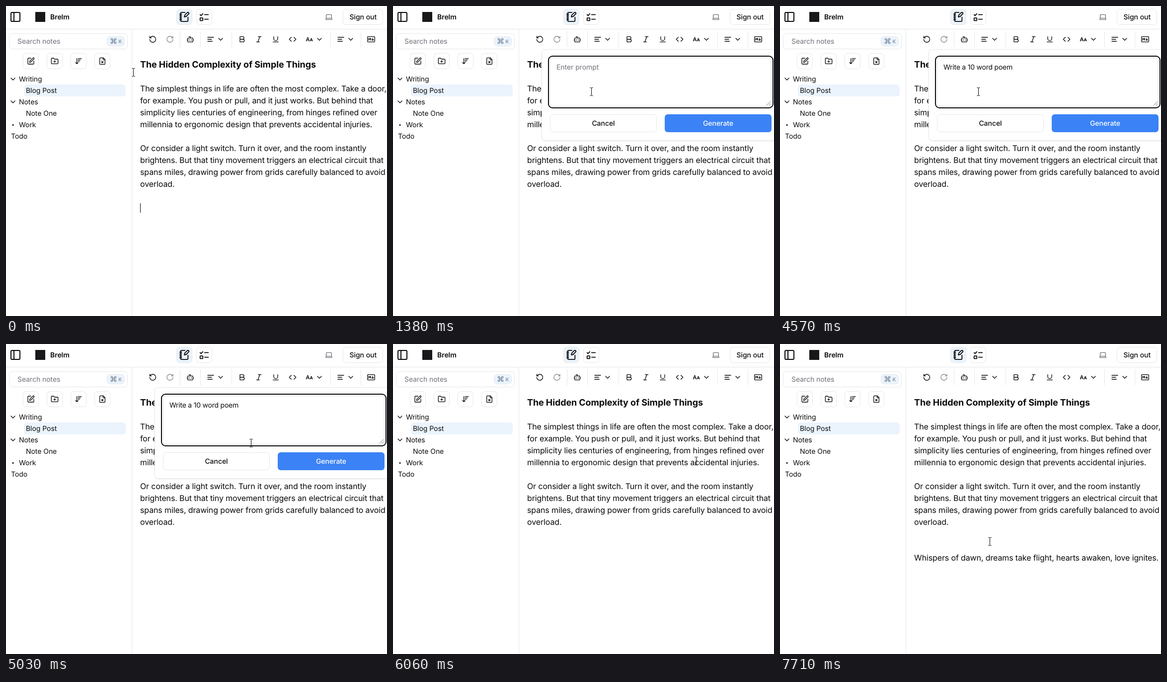
An HTML page that plays this animation: 767 by 624 pixels, repeating every 8000 ms.

```html
<!DOCTYPE html>
<html lang="en">
<head>
<meta charset="utf-8">
<title>Notes editor</title>
<style>
  html, body { margin: 0; width: 100%; height: 100%; overflow: hidden; background: #fff; }
  svg { display: block; width: 767px; height: 624px; }
  text { font-family: Inter, Roboto, sans-serif; font-size: 14px; letter-spacing: -.05px; fill: #0c0c0e; white-space: pre; text-rendering: geometricPrecision; }
  .body { font-size: 16px; letter-spacing: -.13px; fill: #09090b; }
  .title { font-size: 18px; font-weight: 700; letter-spacing: -.1px; }
  .medium { font-weight: 500; }
  .strong { font-weight: 600; }
  .mid { text-anchor: middle; }
  .muted { fill: #71717a; }
  .prompt { letter-spacing: -.22px; }
  .line { fill: none; stroke: #e5e7eb; }
  .icon { fill: none; stroke: #09090b; stroke-width: 2; stroke-linecap: round; stroke-linejoin: round; }
</style>
</head>
<body>
<svg id="stage" viewBox="0 0 767 624" xmlns="http://www.w3.org/2000/svg"></svg>
<script>
const LOOP = 8000;
const stage = document.getElementById('stage');

// Icon outlines on a 24 unit grid.
const PEN = 'M18.4 2.6a1 1 0 0 1 3 3l-9 9a2 2 0 0 1-.9.5l-2.9.9a.5.5 0 0 1-.6-.6l.9-2.9a2 2 0 0 1 .5-.9z';
const ICONS = {
  panel: 'M5 3h14a2 2 0 0 1 2 2v14a2 2 0 0 1-2 2H5a2 2 0 0 1-2-2V5a2 2 0 0 1 2-2zM9 3v18',
  notebook: 'M13.4 2H6a2 2 0 0 0-2 2v16a2 2 0 0 0 2 2h12a2 2 0 0 0 2-2v-7.4M2 6h4M2 10h4M2 14h4M2 18h4M21.4 5.6a1 1 0 1 0-3-3l-5 5a2 2 0 0 0-.5.9l-.9 2.9a.5.5 0 0 0 .6.6l2.9-.9a2 2 0 0 0 .9-.5z',
  tasks: 'M3 7l2 2 4-4M13 7h8M13 17h8M4 14h4a1 1 0 0 1 1 1v4a1 1 0 0 1-1 1H4a1 1 0 0 1-1-1v-4a1 1 0 0 1 1-1z',
  laptop: 'M20 16V7a2 2 0 0 0-2-2H6a2 2 0 0 0-2 2v9m16 0H4m16 0 1.3 2.5a1 1 0 0 1-.9 1.5H3.6a1 1 0 0 1-.9-1.5L4 16',
  command: 'M15 6v12a3 3 0 1 0 3-3H6a3 3 0 1 0 3 3V6a3 3 0 1 0-3 3h12a3 3 0 1 0-3-3',
  edit: 'M12 3H5a2 2 0 0 0-2 2v14a2 2 0 0 0 2 2h14a2 2 0 0 0 2-2v-7' + PEN,
  folder: 'M12 10v6M9 13h6M20 20a2 2 0 0 0 2-2V8a2 2 0 0 0-2-2h-7.9a2 2 0 0 1-1.7-.9l-.8-1.2A2 2 0 0 0 7.9 3H4a2 2 0 0 0-2 2v13a2 2 0 0 0 2 2Z',
  sort: 'M3 16l4 4 4-4M7 20V4M11 4h10M11 8h7M11 12h4',
  file: 'M15 2H6a2 2 0 0 0-2 2v16a2 2 0 0 0 2 2h12a2 2 0 0 0 2-2V7ZM14 2v4a2 2 0 0 0 2 2h4M14.5 12.5l-5 5M9.5 12.5l5 5',
  chevron: 'M6 9l6 6 6-6',
  undo: 'M3 12a9 9 0 1 0 9-9 9.8 9.8 0 0 0-6.7 2.7L3 8M3 3v5h5',
  redo: 'M21 12a9 9 0 1 1-9-9c2.5 0 4.9 1 6.7 2.7L21 8M21 3v5h-5',
  bot: 'M12 8V4H8M6 8h12a2 2 0 0 1 2 2v8a2 2 0 0 1-2 2H6a2 2 0 0 1-2-2v-8a2 2 0 0 1 2-2zM2 14h2M20 14h2M15 13v2M9 13v2',
  align: 'M21 6H3M15 12H3M17 18H3',
  bold: 'M6 12h9a4 4 0 0 1 0 8H7a1 1 0 0 1-1-1V5a1 1 0 0 1 1-1h7a4 4 0 0 1 0 8',
  italic: 'M19 4h-9M14 20H5M15 4 9 20',
  underline: 'M6 4v6a6 6 0 0 0 12 0V4M4 20h16',
  code: 'M16 18l6-6-6-6M8 6l-6 6 6 6',
  markdown: 'M3 4h18a2 2 0 0 1 2 2v12a2 2 0 0 1-2 2H3a2 2 0 0 1-2-2V6a2 2 0 0 1 2-2zM5 15V9l3 3 3-3v6M17 9v6M14.5 13l2.5 2.5 2.5-2.5'
};

const icon = (name, cx, cy, size = 16, color = '#09090b') =>
  `<path class="icon" d="${ICONS[name]}" style="stroke:${color}" transform="translate(${cx - size / 2} ${cy - size / 2}) scale(${size / 24})"/>`;
const text = (x, y, str, cls = '', extra = '') => `<text x="${x}" y="${y}" class="${cls}" ${extra}>${str}</text>`;
const box = (x, y, w, h, fill = 'none', extra = '') =>
  `<rect class="line" x="${x + .5}" y="${y + .5}" width="${w - 1}" height="${h - 1}" rx="6" style="fill:${fill}" ${extra}/>`;
const rule = d => `<path class="line" d="${d}"/>`;

const header = () =>
  rule('M0 46.5H767M253.5 47V624') +
  icon('panel', 19, 22, 24) +
  '<rect x="59" y="12" width="20" height="20" fill="#18181b"/>' +
  text(89, 27, 'Brelm', 'strong') +
  box(343, 6, 32, 32, '#ebf4fd') + icon('notebook', 359, 22, 22) +
  box(383, 6, 32, 32) + icon('tasks', 399, 22, 22) +
  icon('laptop', 650, 22, 16, '#71717a') +
  box(678, 6, 81, 32) + text(691.5, 27, 'Sign out', 'medium');

const sidebar = () =>
  box(6, 55, 239, 32) + text(23, 76, 'Search notes', 'muted') +
  box(203, 61, 36, 20, '#ebf4fd') + icon('command', 216.5, 70.5, 14, '#64748b') +
  text(226.5, 74.5, 'K', '', 'style="font-size:10px;fill:#64748b"') +
  ['edit', 'folder', 'sort', 'file'].map((n, i) => box(34 + 48 * i, 95, 32, 32) + icon(n, 50 + 48 * i, 111)).join('') +
  '<rect x="36" y="158" width="205" height="24" rx="6" fill="#ebf4fd"/>' +
  icon('chevron', 14, 147) + icon('chevron', 14, 193) +
  '<circle cx="14" cy="239.5" r="1.5"/>' +
  [[26, 'Writing'], [40, 'Blog Post'], [26, 'Notes'], [40, 'Note One'], [26, 'Work'], [10, 'Todo']]
    .map(([x, s], i) => text(x, 152 + 23 * i, s)).join('');

const toolbar = () =>
  [350, 391, 454, 653, 714].map(x => rule(`M${x + .5} 51V83`)).join('') +
  icon('redo', 330, 67, 16, '#8e8e93') +
  [['undo', 295.5], ['bot', 371], ['align', 412], ['chevron', 432], ['bold', 475], ['italic', 509],
    ['underline', 543], ['code', 577], ['chevron', 631], ['align', 674], ['chevron', 694], ['markdown', 735]]
    .map(([n, x]) => icon(n, x, 67)).join('') +
  text(603.5, 71, 'A', 'strong', 'style="font-size:11px"') +
  text(611.5, 71, 'ᴀ', 'strong', 'style="font-size:11px"');

const LINES = [
  'The simplest things in life are often the most complex. Take a door,',
  'for example. You push or pull, and it just works. But behind that',
  'simplicity lies centuries of engineering, from hinges refined over',
  'millennia to ergonomic design that prevents accidental injuries.',
  '',
  'Or consider a light switch. Turn it over, and the room instantly',
  'brightens. But that tiny movement triggers an electrical circuit that',
  'spans miles, drawing power from grids carefully balanced to avoid',
  'overload.'
];
const article = () =>
  text(270, 124, 'The Hidden Complexity of Simple Things', 'title') +
  LINES.map((s, i) => text(270, 172 + 24 * i, s, 'body')).join('') +
  '<rect id="mainCaret" x="270" y="397" width="1" height="19"/>' +
  text(270, 436, '', 'body', 'id="poem"');

const popup = () => `<g id="popup">
  <rect x="301" y="91" width="476" height="180" rx="6" fill="#000" opacity=".13" filter="url(#soft)"/>
  ${box(299, 87, 480, 184, '#fff')}
  <rect id="ring" x="313" y="101" width="452" height="104" rx="8" fill="#fff" stroke="#09090b" stroke-width="2"/>
  ${box(316, 104, 446, 98)}
  <path d="M752 200l8-8M756.5 200l3.5-3.5" stroke="#777" fill="none"/>
  ${text(329, 128, 'Enter prompt', 'muted', 'id="hint"')}
  ${text(329, 128, '', 'prompt', 'id="typed"')}
  <rect id="caret" x="329" y="115" width="1" height="16"/>
  ${box(316, 218, 215, 36)}${text(423.5, 241, 'Cancel', 'medium mid')}
  <rect id="submit" x="547" y="218" width="215" height="36" rx="6"/>
  ${text(654.5, 241, 'Generate', 'medium mid', 'style="fill:#fff"')}
</g>`;

const CURSORS = {
  beam: '<path d="M-3-8h2.3L0-7.3.7-8H3M0-7.3V7.3M-3 8h2.3L0 7.3.7 8H3" fill="none" stroke="#000"/>',
  arrow: '<path d="M0 0V16l3.7-3.5 2.5 5.8 2.6-1.1-2.4-5.6H11Z" fill="#fff" stroke="#000" stroke-linejoin="round"/>',
  hand: '<path d="M-2 13V1.8a1.9 1.9 0 0 1 3.8 0V7.5a1.8 1.8 0 0 1 3.3.7 1.7 1.7 0 0 1 2.8.8 1.5 1.5 0 0 1 2.1 1.4V15q0 2.7-1.7 5v2.5H-2.5V20l-4.7-6.6a1.6 1.6 0 0 1 2.6-2Z" fill="#fff" stroke="#000" stroke-linejoin="round"/>'
};

stage.innerHTML =
  '<defs><filter id="soft" x="-10%" y="-10%" width="120%" height="120%"><feGaussianBlur stdDeviation="2.5"/></filter></defs>' +
  header() + sidebar() + toolbar() + article() + popup() +
  Object.entries(CURSORS).map(([k, s]) => `<g id="${k}">${s}</g>`).join('');

const $ = id => document.getElementById(id);
const show = (id, on) => { $(id).style.display = on ? '' : 'none'; };
const clamp = x => Math.min(1, Math.max(0, x));
const smooth = x => x * x * (3 - 2 * x);
const ease = x => 1 - Math.pow(1 - x, 2.35);

const OPEN = 705, CLOSE = 5210, FADE = 150, FOCUS = 690, BLINK = 530;
const PROMPT = 'Write a 10 word poem';
const KEYS = [1990, 2080, 2190, 2190, 2290, 2440, 2640, 2730, 2910, 3000, 3090];
for (let i = 0; i < 9; i++) KEYS.push(3240 + 97.5 * i);

const WORDS = ['Whispers', ' of', ' dawn', ',', ' dreams', ' take', ' flight', ',', ' hearts', ' awaken', ',', ' love', ' ignites', '.'];
const wordTime = i => i ? 6870 + 65 * (i - 1) : 6780;

// Pointer legs: start, end, destination.
const HOME = [256.5, 133];
const LEGS = [
  [60, 690, 379, 68],
  [870, 1380, 399.5, 172],
  [4800, 5190, 611.5, 234.5],
  [6030, 6750, 438.5, 354.5],
  [6850, 7650, 422.5, 397.5]
];

function pointer(t) {
  let [x, y] = HOME;
  for (const [a, b, tx, ty] of LEGS) {
    const k = smooth(clamp((t - a) / (b - a)));
    x += (tx - x) * k;
    y += (ty - y) * k;
  }
  return [x, y];
}

function pointerKind(x, y, open) {
  if (y < 88) return 'arrow';
  if (!open || x < 300) return 'beam';
  if (y > 218 && y < 254 && x > 547) return 'hand';
  return y > 104 && y < 202 && x > 316 ? 'beam' : 'arrow';
}

function drawPopup(t, held) {
  const enter = ease(clamp((held - OPEN) / FADE));
  const leave = ease(clamp((held - CLOSE) / FADE));
  const open = held >= OPEN && leave < 1;
  const sent = held >= CLOSE;
  show('popup', open);
  if (!open) return false;

  const scale = sent ? 1 - .05 * leave : .95 + .05 * enter;
  const slide = sent ? 0 : -8 * (1 - enter);
  $('popup').setAttribute('transform', `translate(539 ${179 + slide}) scale(${scale}) translate(-539 -179)`);
  $('popup').setAttribute('opacity', sent ? 1 - leave : enter);
  $('submit').setAttribute('fill', sent ? '#3b3b3b' : '#3b82f6');

  const count = sent ? 0 : KEYS.filter(k => k <= t).length;
  $('typed').textContent = PROMPT.slice(0, count);
  show('hint', !count);
  show('ring', !sent);
  const since = t - (count ? KEYS[count - 1] : FOCUS);
  show('caret', !sent && Math.floor(since / BLINK) % 2 === 0);
  $('caret').setAttribute('x', 329 + (count ? Math.round($('typed').getComputedTextLength()) : 0));
  return true;
}

function render(t) {
  const held = Math.floor(t / 60) * 60;
  const open = drawPopup(t, held);
  show('mainCaret', t < OPEN);
  $('poem').textContent = WORDS.filter((w, i) => t >= wordTime(i)).join('');

  const [x, y] = pointer(held);
  const kind = pointerKind(x, y, open);
  for (const k in CURSORS) show(k, k === kind);
  const snap = kind === 'beam' ? .5 : 0;
  $(kind).setAttribute('transform', `translate(${Math.floor(x) + snap} ${Math.floor(y) + snap})`);
}

const start = performance.now();
function tick(now) {
  render(Math.max(0, now - start) % LOOP);
  requestAnimationFrame(tick);
}
render(0);
requestAnimationFrame(tick);
</script>
</body>
</html>
```
